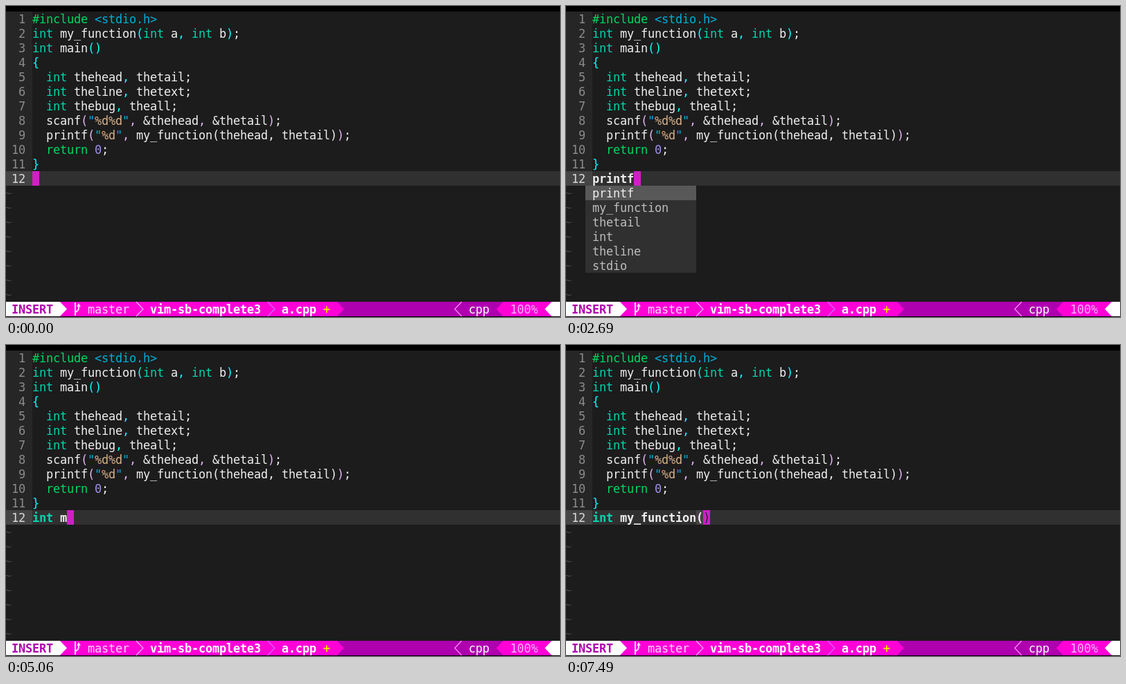
Write an HTML page with a canvas that moves like this. It is 800 by 450 pixels and loops after 8000 ms.

```html
<!DOCTYPE html>
<html lang="en">
<head>
<meta charset="utf-8">
<title>Code completion</title>
<style>
html, body { margin: 0; width: 100%; height: 100%; overflow: hidden; background: #000; }
canvas { display: block; }
</style>
</head>
<body>
<canvas width="800" height="450"></canvas>
<script>
const ctx = document.querySelector('canvas').getContext('2d', { alpha: false });
const LOOP = 8000, CELL = 10, ROW = 21, TOP = 8, LEFT = 38;
const CURRENT = TOP + 11 * ROW, STATUS = TOP + 20 * ROW;

const ink = {
  w: '#eeeeee', g: '#00d75f', b: '#00afd7', t: '#00d7af',
  c: '#00ffff', p: '#e4b4f4', s: '#d7af87', n: '#a292e4'
};

// Runs are separated by "|"; the first letter of each run is its ink.
const code = [
  'g#include |b<stdio.h>',
  'tint|w my_function|c(|tint|w a|c,|w |tint|w b|c)|w;',
  'tint|w main|c()',
  'c{',
  'w  |tint|w thehead|c,|w thetail;',
  'w  |tint|w theline|c,|w thetext;',
  'w  |tint|w thebug|c,|w theall;',
  'w  scanf|p(|b"|s%d%d|b"|p,|w &thehead|p,|w &thetail|p)|w;',
  'w  printf|p(|b"|s%d|b"|p,|w my_function(thehead, thetail)|p)|w;',
  'w  |greturn|w |n0|w;',
  'c}'
];
const menu = ['printf', 'my_function', 'thetail', 'int', 'theline', 'stdio'];

const insertMode = {
  name: 'INSERT', label: '#af00af', seg: '#ff00d7', bar: '#af00af', branch: '#ffd7ff',
  sep1: '#ffafff', sep2: '#d75fff', sep3: '#ff87ff', percent: '#ffafff'
};
const compMode = {
  name: 'I·COMP', label: '#0d5520', seg: '#08a335', bar: '#0d4f1e', branch: '#ffffaf',
  sep1: '#a8d820', sep2: '#0d6a2c', sep3: '#08a335', percent: '#9c9488'
};

// [time, changed state]
const events = [[0, { line: '', cursor: 0, pick: -1, mode: insertMode }]];
const at = (time, change) => events.push([time, change]);
const type = (time, line) => at(time, { line, cursor: line.length });

type(1460, 'i');
for (let k = 1; k <= 11; k++) {
  type(1930 + 40 * k + 10 * Math.max(0, k - 9), 'i'.repeat(1 + Math.round(k * 16 / 11)));
}
type(2640, 'printf');
at(2690, { pick: 0 });
[3610, 3790, 3950].forEach((time, i) => at(time, { pick: i + 1 }));
at(4170, { pick: -1 });
type(4210, 'int');
type(4450, 'int ');
[5060, 5190, 5270, 5340, 5410, 5480, 5640, 5680, 5840, 5880, 6050, 6100]
  .forEach((time, i) => type(time, 'int my_functionn'.slice(0, 5 + i)));
at(6370, { mode: compMode });
type(6420, 'int my_function');
at(7230, { mode: insertMode });
type(7450, 'int my_function()');
at(7490, { cursor: 16 });

function stateAt(time) {
  const state = {};
  for (const [start, change] of events) if (start <= time) Object.assign(state, change);
  return state;
}

function rect(x, y, w, h, color) {
  ctx.fillStyle = color;
  ctx.fillRect(x, y, w, h);
}

function text(str, x, top, color, bold) {
  ctx.font = (bold ? 'bold ' : '') + '17px "DejaVu Sans Mono", monospace';
  ctx.fillStyle = color;
  [...str].forEach((ch, i) => ctx.fillText(ch, x + i * CELL, top + 17));
}

// Solid tip from the flat edge at x to the point at x + dx
function tip(x, dx, color) {
  ctx.fillStyle = color;
  ctx.beginPath();
  ctx.moveTo(x, STATUS);
  ctx.lineTo(x + dx, STATUS + ROW / 2);
  ctx.lineTo(x, STATUS + ROW);
  ctx.fill();
}

function chevron(x, dx, color) {
  ctx.strokeStyle = color;
  ctx.lineWidth = 1.2;
  ctx.beginPath();
  ctx.moveTo(x, STATUS);
  ctx.lineTo(x + dx, STATUS + ROW / 2);
  ctx.lineTo(x, STATUS + ROW);
  ctx.stroke();
}

function branchIcon(x, y, color) {
  ctx.strokeStyle = ctx.fillStyle = color;
  ctx.lineWidth = 2;
  ctx.stroke(new Path2D(`M${x + 2} ${y + 1}v19M${x + 2} ${y + 15}q5 -2 5 -6v-3`));
  ctx.fill(new Path2D(`M${x + 4} ${y + 7}l3 -5l3 5z`));
}

function drawCode() {
  rect(0, 0, 800, 450, '#000');
  rect(0, TOP, 800, STATUS - TOP, '#1c1c1c');
  rect(0, TOP, LEFT, CURRENT - TOP, '#262626');
  code.forEach((runs, i) => {
    const y = TOP + i * ROW;
    let x = LEFT;
    text(String(i + 1).padStart(2), 8, y, '#8a8a8a');
    for (const run of runs.split('|')) {
      text(run.slice(1), x, y, ink[run[0]]);
      x += (run.length - 1) * CELL;
    }
  });
  for (let y = CURRENT + ROW; y < STATUS; y += ROW) text('~', -2, y, '#444');
}

function drawLine({ line, cursor }) {
  rect(LEFT, CURRENT, 800 - LEFT, ROW, '#303030');
  rect(0, CURRENT, LEFT, ROW, '#444');
  text('12', 8, CURRENT, '#dadada');
  const x = LEFT + cursor * CELL;
  if (line[cursor]) rect(x - CELL, CURRENT, CELL, ROW, '#444');
  rect(x, CURRENT, CELL, ROW, '#d11fc6');
  const keyword = /^int/.test(line) ? 3 : 0;
  [...line].forEach((ch, i) => {
    const color = i === cursor ? '#262626' : i < keyword ? ink.t : ink.w;
    text(ch, LEFT + i * CELL, CURRENT, color, i !== cursor);
  });
}

function drawMenu(pick) {
  if (pick < 0) return;
  menu.forEach((word, i) => {
    const y = CURRENT + (i + 1) * ROW;
    rect(28, y, 160, ROW, i === pick ? '#585858' : '#303030');
    text(word, LEFT, y, i === pick ? '#eeeeee' : '#bcbcbc');
  });
}

function drawStatus(mode) {
  rect(0, STATUS, 800, ROW, mode.bar);
  rect(78, STATUS, 400, ROW, mode.seg);
  rect(0, STATUS, 78, ROW, '#fff');
  tip(78, 10, '#fff');
  tip(478, 10, mode.seg);
  text(mode.name, 8, STATUS, mode.label, true);
  branchIcon(98, STATUS, mode.branch);
  text('master', 118, STATUS, mode.branch);
  chevron(188, 10, mode.sep1);
  text('vim-sb-complete3', 208, STATUS, '#fff', true);
  chevron(378, 10, mode.sep2);
  text('a.cpp', 398, STATUS, '#fff', true);
  text('+', 458, STATUS, '#ffd700', true);
  chevron(658, -10, mode.sep3);
  text('cpp', 668, STATUS, '#fff');
  rect(718, STATUS, 70, ROW, mode.seg);
  tip(718, -10, mode.seg);
  text('100%', 728, STATUS, mode.percent);
  rect(788, STATUS, 12, ROW, '#fff');
  tip(788, -10, '#fff');
}

const begin = performance.now();
function frame() {
  const state = stateAt((performance.now() - begin) % LOOP);
  drawCode();
  drawLine(state);
  drawMenu(state.pick);
  drawStatus(state.mode);
  requestAnimationFrame(frame);
}
frame();
</script>
</body>
</html>
```
